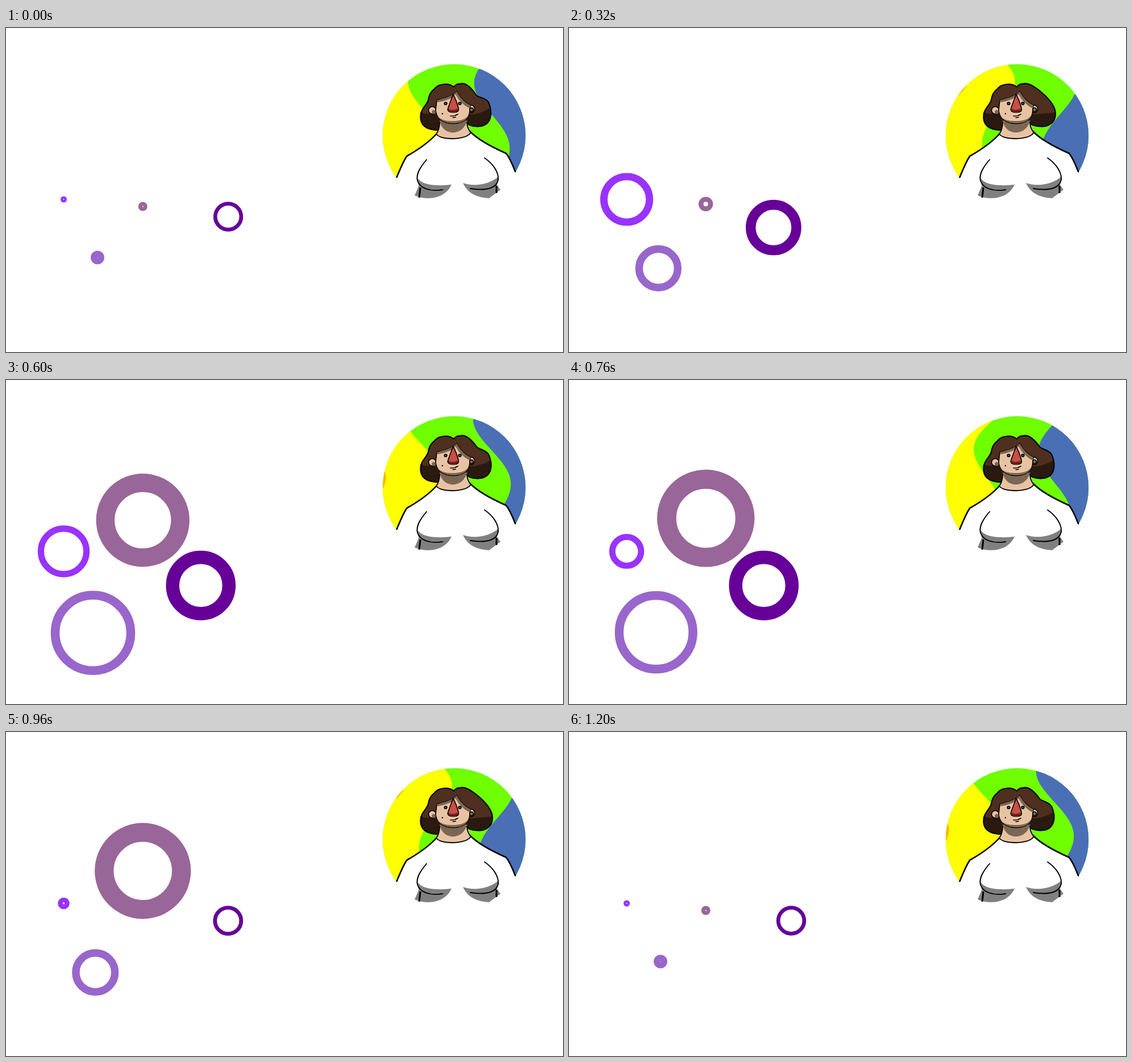
Recreate the animation shown at these times as an HTML page. Size 980 by 571 pixels, loop 1280 ms.

```html
<!DOCTYPE html>
<html>
<head>
<meta charset="utf-8">
<style>
  html, body { margin: 0; height: 100%; overflow: hidden; background: #fff; }
  svg { display: block; width: 980px; height: 571px; }
  .line { fill: none; stroke: #000; stroke-linecap: round; stroke-linejoin: round; }
  .skin { fill: #e8c3a3; stroke: #000; stroke-width: 1.6; }
  .shade { fill: #7b6653; }
  .grey { fill: #808080; }
</style>
</head>
<body>
<svg viewBox="0 0 980 571">
  <defs>
    <clipPath id="disc"><circle cx="788.5" cy="189.5" r="125.7"/></clipPath>
    <clipPath id="hairClip"><path class="hair"/></clipPath>
  </defs>
  <g id="rings" fill="none"></g>

  <g id="bands" clip-path="url(#disc)">
    <path fill="#6fff00" d="M650 50H930V330H650Z"/>
  </g>

  <path class="hair" fill="#4f2f1f"/>
  <path id="hairShade" fill="#2a190f" clip-path="url(#hairClip)"/>
  <path class="hair line" stroke-width="2"/>

  <path fill="#fff" d="M757 187Q740 206 705 226Q698 237 687 264V330H896V254Q887 230 880 221Q835 201 817 183Z"/>
  <path fill="#e8c3a3" d="M763 163Q763 178 757 187Q763 195 787 195Q812 194 818 184Q811 177 811 163Z"/>
  <path class="shade" d="M763 163Q767 183 786 184.500Q806 183 811 163Z"/>
  <path class="line" stroke-width="1.800" d="M763 166Q763 178 757 187Q763 195 787 195Q812 194 818 184Q811 177 811 166"/>
  <path class="line" stroke-width="2.600" d="M757 187Q740 206 705 226Q698 237 687.500 263M817 183Q835 201 880 221Q887 230 896 253"/>

  <ellipse class="skin" cx="750" cy="145" rx="6.500" ry="6.500"/>
  <ellipse class="skin" cx="819" cy="142.500" rx="5.500" ry="6.500"/>
  <path class="skin" d="M793 112Q783 122 758 127L756 145C757 160 770 168.500 787 168.500C803 168.500 815 160 816 146L817 136Q803 130 793 112Z"/>
  <path class="shade" d="M793 112Q783 122 758 127V131Q783 127 791 117Q799 133 816 142L817 136Q803 130 793 112Z"/>
  <path class="shade" d="M757 151C761 161 772 164 787 164C802 164 812 159 815 150C813 162 802 168 787 168C771 168 760 161 757 151Z"/>
  <circle class="shade" cx="752.500" cy="148" r="3.500"/>
  <circle class="shade" cx="819" cy="144" r="3.300" stroke="#000" stroke-width="1.500"/>
  <g fill="#6b5848" stroke="#000" stroke-width="1.800">
    <circle cx="773.500" cy="133" r="2.200"/>
    <circle cx="798.500" cy="133" r="2.200"/>
  </g>
  <circle cx="767.800" cy="151" r="1.300"/>
  <path fill="#cb4d45" stroke="#000" stroke-width="1.600" d="M786.500 117L777.500 142Q776 149 787 148.500Q798 149 796 141Q792 126 786.500 117Z"/>
  <path fill="#6d2721" d="M778 142Q787 147 796 141Q797 148 787 148Q777 148 778 142Z"/>
  <path class="line" stroke-width="1.600" d="M782 155Q789 156 795 152M786 158Q789 158 791 157"/>

  <path class="grey" d="M724 264C732 277 755 279 784 276C776 292 762 300 742 300Q730 300 719 295L726 279Z"/>
  <path class="grey" d="M804 273C820 279 848 278 866 262L864 277L870 285L850 300C830 299 812 292 804 273Z"/>
  <path class="line" stroke-width="1.900" d="M740 232C728 246 721 258 724 269C728 282 745 289 768 285M842 229C858 240 867 255 866 267C864 280 850 288 817 283"/>
  <path class="line" stroke-width="3" style="stroke-linecap:butt" d="M729 281L727 299M863 278V291"/>
</svg>
<script>
const LOOP = 1280, STEP = 40, DRAWINGS = 8, WAVELENGTH = 232;

// Each ring swells and shrinks between two sizes; its centre drifts with its growth.
const rings = [
  { color: '#9933ff', x: 101.5, y: 302, dx: 0, dy: 0,
    outer: [5.5, 49.2], hole: [1, 35.8], rise: [0, 380], fall: [490, 1090], holeFall: [545, 1000] },
  { color: '#996699', x: 240.7, y: 314.5, dx: 0, dy: -.91,
    outer: [8, 85.7], hole: [1, 52], rise: [257, 655], fall: [940, 1200] },
  { color: '#9966cc', x: 161, y: 404.5, dx: -.129, dy: .661,
    outer: [12, 74.3], hole: [.5, 58.7], rise: [168, 488], fall: [710, 1190] },
  { color: '#660099', x: 391, y: 332.5, dx: -1.375, dy: .845,
    outer: [26.2, 61.3], hole: [19.5, 37.9], rise: [86, 480], fall: [760, 970] }
];

// Wavy colour bands: border centre, swing at the top, loss of swing per pixel, outer side
const bands = [
  { color: '#ffff00', centre: 746, swing: 45, decay: .17, side: 640 },
  { color: '#ffb400', centre: 636, swing: 80, decay: .4, side: 640 },
  { color: '#4a6fb5', centre: 859, swing: 38, decay: .07, side: 940 }
];

function add(parent, tag, attributes) {
  const node = document.createElementNS('http://www.w3.org/2000/svg', tag);
  set(node, attributes);
  document.getElementById(parent).append(node);
  return node;
}
function set(node, attributes) {
  for (const name in attributes) node.setAttribute(name, attributes[name]);
}
for (const ring of rings) ring.node = add('rings', 'circle', { stroke: ring.color });
for (const band of bands) band.node = add('bands', 'path', { fill: band.color });

const mix = ([a, b], k) => a + (b - a) * k;

function ease([start, end], t) {
  const k = Math.max(0, Math.min(1, (t - start) / (end - start)));
  return (1 - Math.cos(Math.PI * k)) / 2;
}

function drawRing({ node, x, y, dx, dy, outer, hole, rise, fall, holeFall = fall }, t) {
  const radius = mix(outer, ease(rise, t) - ease(fall, t));
  const inner = mix(hole, ease(rise, t) - ease(holeFall, t));
  const growth = radius - outer[0];
  set(node, {
    cx: x + dx * growth, cy: y + dy * growth,
    r: (radius + inner) / 2, 'stroke-width': radius - inner
  });
}

function drawBand({ node, centre, swing, decay, side }, index) {
  const crest = 100 + WAVELENGTH * index / DRAWINGS;
  let d = `M${side} 60`;
  for (let y = 60; y <= 270; y += 3) {
    const reach = Math.max(0, swing - decay * (y - 60));
    d += `L${centre - reach * Math.cos(2 * Math.PI * (y - crest) / WAVELENGTH)} ${y}`;
  }
  set(node, { d: `${d}L${side} 270Z` });
}

// k goes from a curled-in right side (0) to a smooth bob (1)
function drawHair(k) {
  const d = `M788 104C779 96 761 98 754 107C746 113 744 119 743 126C742 134 733 139 730 150
    C727 166 733 180 762 180L811 169C820 174 ${834 + 3 * k} 176 ${844 + 2 * k} 170
    C${854 + 4 * k} 163 ${856 + 2 * k} 148 ${849 + 3 * k} ${131 + 6 * k}
    C${845 + 2 * k} ${123 + 5 * k} ${835 + 3 * k} ${124 - 5 * k} ${828 + 4 * k} ${119 - 5 * k}
    C${820 + 4 * k} 107 810 96 800 98C794 98 790 101 788 104Z`;
  document.querySelectorAll('.hair').forEach(node => set(node, { d }));
  set(document.getElementById('hairShade'), {
    d: `M720 145Q738 154 758 150L822 152Q842 150 860 ${134 + 14 * k}V190H720Z`
  });
}

function render(now) {
  const t = Math.min(1200, Math.floor(now % LOOP / STEP) * STEP);
  const index = Math.floor(t / (2 * STEP)) % DRAWINGS;
  rings.forEach(ring => drawRing(ring, t));
  bands.forEach(band => drawBand(band, index));
  drawHair(ease([0, DRAWINGS / 2], Math.min(index, DRAWINGS - index)));
  requestAnimationFrame(render);
}
render(0);
</script>
</body>
</html>
```
